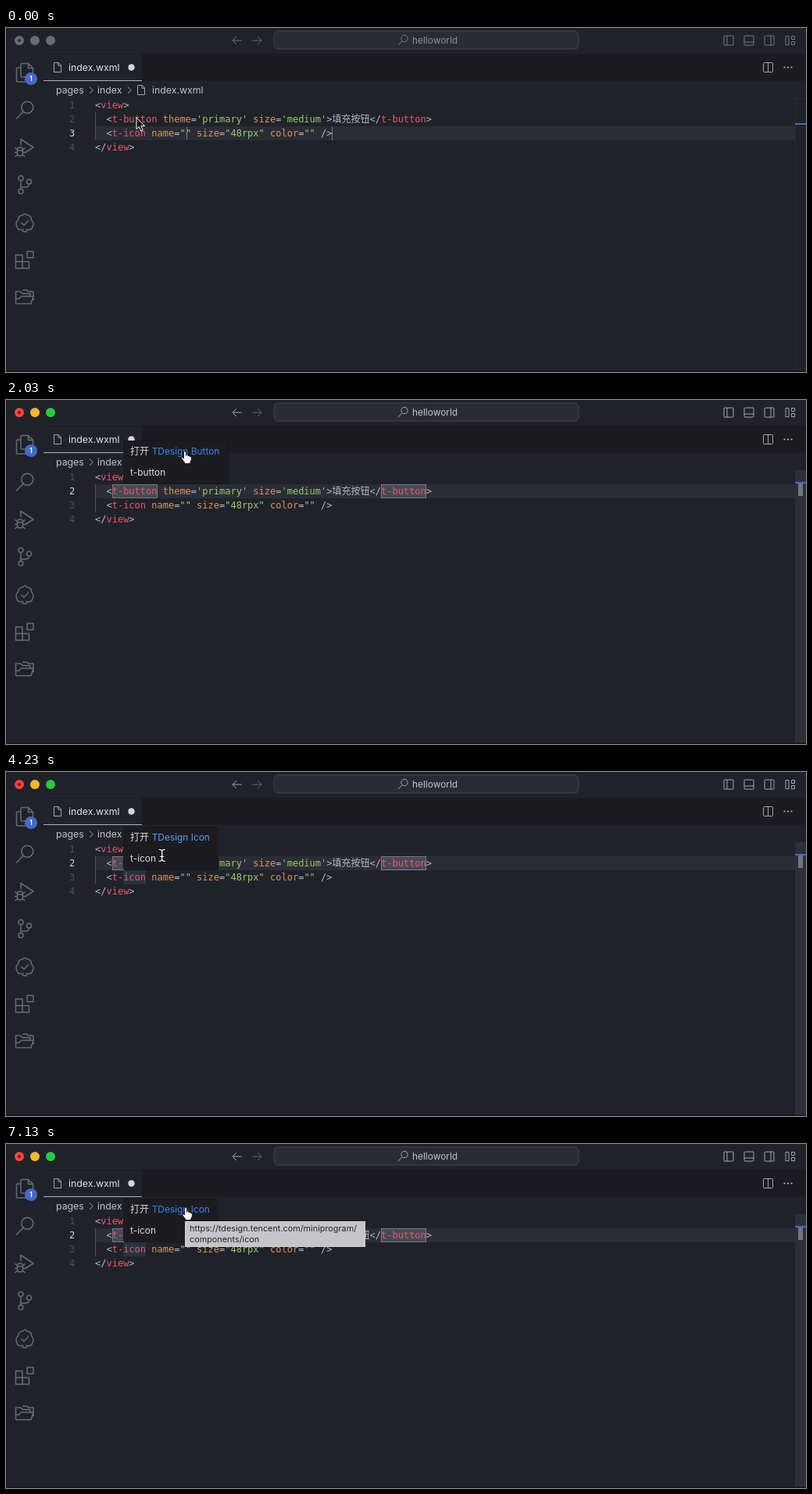
An HTML page for the animation above (7.16 s loop, 1024x441 px).

```html
<!DOCTYPE html>
<html lang="zh-CN">
<head>
<meta charset="utf-8">
<title>Editor hover</title>
<style>
html, body { margin: 0; width: 100%; height: 100%; overflow: hidden; background: #1f2229; }
svg { display: block; width: 100vw; height: 100vh; }
text { white-space: pre; }
.ui { font-family: Inter, "Noto Sans CJK SC", "Noto Sans CJK", sans-serif; font-size: 12.3px; fill: #bfc3ca; }
.small { font-size: 11.9px; }
.code { font-family: "DejaVu Sans Mono", "Noto Sans CJK SC", "Noto Sans CJK", monospace; font-size: 12px; fill: #b3b9c4; }
.tag { fill: #e9586a; }
.attr { fill: #d9975f; }
.str { fill: #98cc70; }
.num { text-anchor: end; fill: #4a4f58; }
.line { fill: none; stroke: #a4a7ad; stroke-width: 1; }
.side { fill: none; stroke: #686c74; stroke-width: 1.5; stroke-linejoin: round; }
</style>
</head>
<body>
<svg id="stage" viewBox="0 0 1024 441" preserveAspectRatio="none">
  <defs>
    <g id="file"><path class="line" d="M.5.5H6.2L9.5 4V12.5H.5ZM6 .5V4.2H9.5"/></g>
    <path id="chevron" class="line" d="M0 0L4 4.2L0 8.4"/>
    <path id="pane" class="line" d="M1.5.5H11.5Q12.5.5 12.5 1.5V11.5Q12.5 12.5 11.5 12.5H1.5Q.5 12.5.5 11.5V1.5Q.5.5 1.5.5Z"/>
  </defs>
  <rect width="1024" height="441" fill="#1f2229"/>

  <!-- title bar -->
  <g id="lights">
    <circle cx="17" cy="16" r="6"/><circle cx="37" cy="16" r="6"/><circle cx="57" cy="16" r="6"/>
  </g>
  <circle id="unsaved" cx="17" cy="16" r="2"/>
  <rect x="343" y="4" width="390" height="23" rx="5.5" fill="#292c33" stroke="#44474e"/>
  <path id="back" class="line" d="M301.5 16H290M295 11L290 16L295 21"/>
  <path class="line" d="M315.500 16H327M322 11L327 16L322 21" opacity=".5"/>
  <g id="titleItems">
    <path class="line" d="M502 22L507.300 16.300"/><circle class="line" cx="510" cy="13.500" r="4.200"/>
    <text class="ui small" x="520" y="20">helloworld</text>
    <g transform="translate(918.500 9.500)"><use href="#pane"/><path class="line" d="M4.500.5V12.500"/></g>
    <g transform="translate(944.500 9.500)"><use href="#pane"/><path class="line" d="M.5 8.500H12.500"/></g>
    <g transform="translate(970.500 9.500)"><use href="#pane"/><path class="line" d="M8.500.5V12.500"/></g>
    <path class="line" d="M998 10.500H1002V21.500H998ZM1005.500 10.500H1009.500V14.500H1005.500ZM1005.500 17.500H1009.500V21.500H1005.500Z"/>
  </g>

  <!-- tabs and path -->
  <rect x="174" y="33" width="850" height="35" fill="#1b1b20"/>
  <path d="M48 33.500H1024" stroke="#1b1b20"/>
  <path d="M174.500 33V68" stroke="#17171b"/>
  <path d="M48 67.500H174" stroke="#a6b3c8"/>
  <use href="#file" x="61" y="44"/>
  <text class="ui" x="80" y="55" style="fill:#e0e2e6">index.wxml</text>
  <circle cx="160.500" cy="50.500" r="4.200" fill="#d4d5d8"/>
  <g transform="translate(969 44)"><use href="#pane"/><path class="line" d="M6.500.5V12.500"/></g>
  <g fill="#b9bbc0"><circle cx="996.500" cy="50.500" r="1.100"/><circle cx="1001" cy="50.500" r="1.100"/><circle cx="1005.500" cy="50.500" r="1.100"/></g>
  <text class="ui" x="64" y="84">pages</text>
  <use href="#chevron" x="107" y="75.500"/>
  <text class="ui" x="117" y="84">index</text>
  <use href="#chevron" x="156" y="75.500"/>
  <use href="#file" x="168" y="73"/>
  <text class="ui" x="187" y="84">index.wxml</text>

  <!-- activity bar -->
  <g class="side">
    <path d="M19 51V46.500Q19 45.500 20 45.500H28.500L34.500 51.500V62Q34.500 63 33.500 63H20Q19 63 19 62V51H14.500Q13.500 51 13.500 52V68Q13.500 69 14.500 69H27Q28 69 28 68V63M28.500 45.500V51.500H34.500"/>
    <path d="M13 116.500L22 107.500"/><circle cx="27.300" cy="101.800" r="7.500"/>
    <path d="M19 150V142.500L35 153L25 159.500"/>
    <path d="M14.500 156.500Q14.500 153 18 153T21.500 156.500V160.500Q21.500 164 18 164T14.500 160.500ZM14.500 157H21.500M11.500 153.500L14.500 156M24.500 153.500L21.500 156M11 159.500H14.500M21.500 159.500H25M11.500 165L15 162M24.500 165L21 162"/>
    <circle cx="19" cy="192.500" r="3"/><circle cx="19" cy="209.500" r="3"/><circle cx="29.500" cy="197" r="3"/>
    <path d="M19 195.500V206.500M29.500 200Q29.500 204 25 204H22Q19 204 19 206.500"/>
    <path d="M20.500 258.500Q14.500 259.500 14 254.500Q11.500 249.500 15.500 246Q16 240 21.500 240Q24 236.500 27 240Q32.500 240 32.500 246Q36.500 249.500 34 254.500Q33 259.500 27.500 258.500M21.500 257.500V261H26.500V257.500M19.500 249.500L23 253L29 246.500"/>
    <path d="M12.500 291H21V308H12.500ZM12.500 299.500H29.500V308H21M27 286.500H35V294.500H27Z"/>
    <path d="M12.500 353V338H19L21 340.500H31V344M12.500 353.500H32L35 344H19.500L16.500 347H13M31 344V340M21 336H27L28.500 338H35V349"/>
  </g>
  <circle cx="32" cy="65" r="8" fill="#436bc6"/>
  <text class="ui" x="32" y="68.400" text-anchor="middle" style="font-size:9px;font-weight:600;fill:#fff">1</text>

  <!-- editor -->
  <rect id="current" x="114" width="896" height="18" fill="#2a2d35"/>
  <path d="M114.500 108V144" stroke="#70404a"/>
  <g id="matches" fill="#464a53" stroke="#777b83">
    <rect x="136.500" y="108.500" width="57" height="17"/><rect x="480.500" y="108.500" width="57" height="17"/>
  </g>
  <rect id="word" x="150" y="126" width="29" height="18" fill="#26343f"/>
  <g id="code"></g>
  <path id="carets" d="M231.500 127V143M417.500 127V144" stroke="#7a7d84"/>
  <path d="M1010.500 90V441" stroke="#292c33"/>
  <path d="M1010 90.500H1024" stroke="#292c33"/>
  <g id="scroll">
    <rect x="1010" y="90" width="14" height="351" fill="#2c2f37"/>
    <rect x="1014" y="107" width="6" height="16" fill="#70747c"/>
  </g>
  <rect id="mark" x="1010" width="14" height="2" fill="#3f6fbd"/>
  <rect y="439.500" width="1024" height="1.500" fill="#1a151f"/>
  <rect width="1" height="441" fill="#191b20"/>

  <g id="popups"></g>
  <g id="tip">
    <rect x="229.500" y="99.500" width="230" height="32" fill="#c6c5c8" stroke="#d2d1d4"/>
    <g class="ui" style="font-size:10.850px;fill:#242427">
      <text x="235" y="112" style="fill:inherit">https://tdesign.tencent.com/miniprogram/</text>
      <text x="235" y="126" style="fill:inherit">components/icon</text>
    </g>
  </g>

  <!-- pointers -->
  <g id="arrow"><path d="M0 0V14.500L3.300 11.500L5.700 17L8.200 16L5.900 10.600H10.500Z" fill="#111" stroke="#fff"/></g>
  <g id="beam" fill="none" stroke-linecap="round">
    <path id="beamShape" d="M-3.500-7.500Q0-7.500 0-5V5Q0 7.500-3.500 7.500M3.500-7.500Q0-7.500 0-5V5Q0 7.500 3.500 7.500M-2 1.500H2" stroke="#111" stroke-width="3"/>
    <use href="#beamShape" style="stroke:#fff"/>
    <path d="M-3.500-7.500Q0-7.500 0-5V5Q0 7.500-3.500 7.500M3.500-7.500Q0-7.500 0-5V5Q0 7.500 3.500 7.500M-2 1.500H2" stroke="#fff" stroke-width="1.300"/>
  </g>
  <g id="hand"><path d="M-1.500 1Q-1.500-.5 0-.5T1.500 1V5.500Q3-.0 4 5.700Q6 4.800 6.300 6.500Q8.500 6 8.500 8.500Q8.500 12 6.800 13.500V15.500H-.5V14Q-3 11-4.500 8.500Q-4.500 6.500-1.500 9Z" fill="#fff" stroke="#111" stroke-width=".9" stroke-linejoin="round"/></g>
</svg>
<script>
const LOOP = 7160;
const CLICK = 420, TIP = 5900;
const LIGHTS = ['#f5453f', '#f6b72d', '#2bc740'];
const $ = id => document.getElementById(id);
const show = (el, on) => { el.style.display = on ? '' : 'none'; };

// Each token is a class letter followed by its text.
const CLASSES = { p: '', t: 'tag', a: 'attr', s: 'str' };
const LINES = [
  ['p<', 'tview', 'p>'],
  ['p  <', 'tt-button', 'a theme', 'p=', "s'primary'", 'a size', 'p=', "s'medium'", 'p>填充按钮</', 'tt-button', 'p>'],
  ['p  <', 'tt-icon', 'a name', 'p=', 's""', 'a size', 'p=', 's"48rpx"', 'a color', 'p=', 's""', 'p />'],
  ['p</', 'tview', 'p>']
];
const esc = s => s.replace(/</g, '&lt;').replace(/>/g, '&gt;');
const span = t => `<tspan class="${CLASSES[t[0]]}">${esc(t.slice(1))}</tspan>`;
$('code').innerHTML = LINES.map((tokens, i) => {
  const y = 103 + 18 * i;
  return `<text class="code num" x="88.300" y="${y}">${i + 1}</text>` +
    `<text class="code" x="114" y="${y}">${tokens.map(span).join('')}</text>`;
}).join('');
const numbers = document.querySelectorAll('.num');

const POPUPS = [
  { from: 1130, to: 3000, y: 52, w: 134, link: 'TDesign Button', end: 274, tag: 't-button' },
  { from: 3120, to: LOOP, y: 70, w: 121, link: 'TDesign Icon', end: 260, tag: 't-icon' }
];
$('popups').innerHTML = POPUPS.map(p => `<g>
  <rect x="150.500" y="${p.y + .5}" width="${p.w}" height="55" rx="2" fill="#1b1b20" stroke="#17181c"/>
  <text class="ui small" x="159" y="${p.y + 18}" style="fill:#d9dbe0"><tspan font-size="12">打开</tspan></text>
  <text class="ui small link" x="186.700" y="${p.y + 18}">${p.link}</text>
  <text class="ui small" x="159" y="${p.y + 45}" style="fill:#d9dbe0">${p.tag}</text>
</g>`).join('');
POPUPS.forEach((p, i) => {
  p.el = $('popups').children[i];
  p.linkEl = p.el.querySelector('.link');
});

// Pointer stops: time, x, y
const PATH = [
  [0, 167, 115], [60, 167, 115], [380, 158, 115], [1250, 158, 115],
  [1800, 229, 66], [2250, 229, 66], [2750, 169, 137], [2950, 169, 137],
  [3350, 164, 136], [3820, 164, 136], [4600, 230, 82], [LOOP, 230, 82]
];
const ease = k => k * k * (3 - 2 * k);
function pointer(t) {
  const i = PATH.findIndex(p => p[0] > t);
  const [t0, x0, y0] = PATH[i - 1], [t1, x1, y1] = PATH[i];
  const k = ease((t - t0) / (t1 - t0));
  return [x0 + (x1 - x0) * k, y0 + (y1 - y0) * k];
}

function draw(t) {
  const active = t >= CLICK;
  const row = active ? 1 : 2;
  const [x, y] = pointer(t);

  [...$('lights').children].forEach((c, i) => c.setAttribute('fill', active ? LIGHTS[i] : '#6b6c71'));
  $('unsaved').setAttribute('fill', active ? '#7d1512' : '#2b2c31');
  $('titleItems').setAttribute('opacity', active ? 1 : .65);
  $('back').setAttribute('opacity', active ? 1 : .6);
  $('current').setAttribute('y', 90 + 18 * row);
  $('mark').setAttribute('y', active ? 105 : 122);
  numbers.forEach((n, i) => { n.style.fill = i === row ? '#d3d6dc' : ''; });
  show($('matches'), active);
  show($('scroll'), active);
  show($('carets'), !active);
  show($('word'), t >= POPUPS[1].from);

  let over = false;
  for (const p of POPUPS) {
    const open = t >= p.from && t < p.to;
    const hit = open && x >= 187 && x <= p.end && y >= p.y + 5 && y <= p.y + 23;
    show(p.el, open);
    p.linkEl.style.fill = hit ? '#3a86f4' : '#569fee';
    over = over || hit;
  }
  show($('tip'), t >= TIP);

  const kind = !active ? 'arrow' : over ? 'hand' : 'beam';
  for (const id of ['arrow', 'beam', 'hand']) show($(id), id === kind);
  $(kind).setAttribute('transform', `translate(${x.toFixed(2)} ${y.toFixed(2)})`);
}

const start = performance.now();
function frame(now) {
  draw(Math.max(0, now - start) % LOOP);
  requestAnimationFrame(frame);
}
draw(0);
requestAnimationFrame(frame);
</script>
</body>
</html>
```
